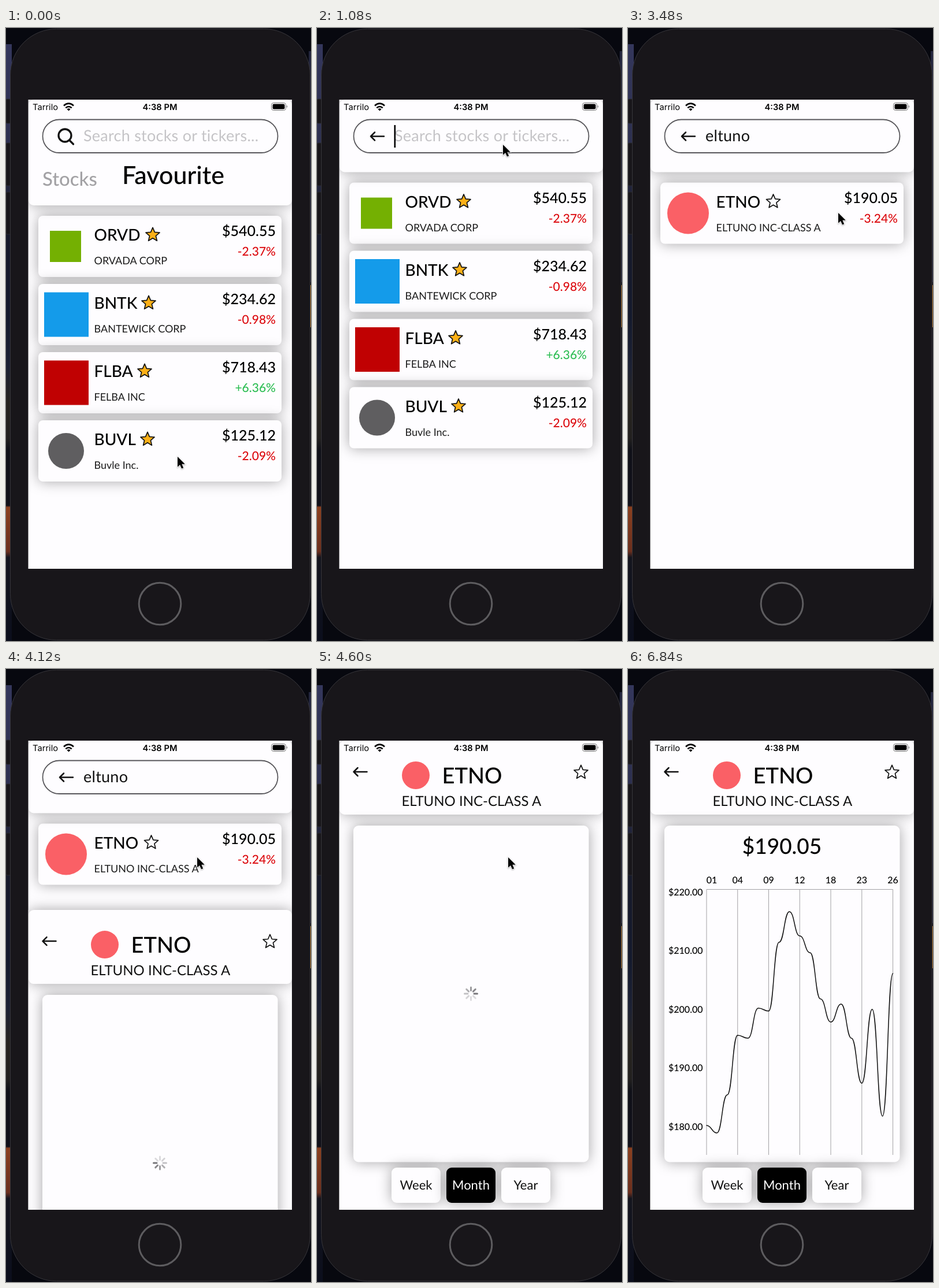
These frames come from a looping animation (528x1061 px, 6880 ms). An HTML page:

```html
<!DOCTYPE html>
<html lang="en">
<head>
<meta charset="utf-8">
<title>Stock search</title>
<style>
  html, body { margin: 0; width: 100%; height: 100%; overflow: hidden; background: #07080f; }
  svg { display: block; width: 528px; height: 1061px; }
  text { font-family: Lato, "Open Sans", sans-serif; text-rendering: geometricPrecision; white-space: pre; }
  .ui { font-family: Inter, Roboto, sans-serif; }
  .panel { fill: #fefdff; filter: drop-shadow(0 0 11.5px rgba(0, 0, 0, .35)); }
  .dark { fill: #000; }
  .line { fill: none; stroke: #111; stroke-linecap: round; stroke-linejoin: round; }
</style>
</head>
<body>
<svg id="stage" viewBox="0 0 528 1061"></svg>
<script>
const LOOP = 6880, STEP = 40;
const FOCUS = 700, SUBMIT = 3040, RESULT = 3200, OPEN = 3976, LOADED = 5240;
const QUERY = "eltuno", KEYS = [1960, 2120, 2280, 2480, 2640, 2800];
const COMPANY = "ELTUNO INC-CLASS A";
const RED = "#dc0a0f", GREEN = "#2fbe55", GOLD = "#fcb017", CORAL = "#fa6066";

// time, x, y of the pointer tip
const POINTER = [
  [0, 297, 742], [120, 297, 742], [640, 322, 202], [3080, 322, 202], [3480, 364, 320],
  [3720, 331, 326], [5640, 331, 326], [6240, 545, 640]
];

const text = (x, y, size, str, more = "") =>
  `<text x="${x}" y="${y}" font-size="${size}" ${more}>${str}</text>`;
const rect = (x, y, w, h, r, more = "") =>
  `<rect x="${x}" y="${y}" width="${w}" height="${h}" rx="${r}" ${more}/>`;
const panel = (x, y, w, h, r, more = "") => rect(x, y, w, h, r, `class="panel ${more}"`);
const disc = (x, y, r, fill) => `<circle cx="${x}" cy="${y}" r="${r}" fill="${fill}"/>`;
const square = (x, y, half, fill) => rect(x - half, y - half, 2 * half, 2 * half, 0, `fill="${fill}"`);
const mid = 'text-anchor="middle" ', end = 'text-anchor="end" ', medium = 'font-weight="500" ';

function star(x, y, fill) {
  const pts = Array.from({ length: 10 }, (_, i) => {
    const r = i % 2 ? 5.7 : 12.6, a = i * Math.PI / 5;
    return (x + r * Math.sin(a)).toFixed(1) + "," + (y - r * Math.cos(a)).toFixed(1);
  });
  return `<polygon points="${pts.join(" ")}" fill="${fill}" stroke="#111" stroke-width="1.7" stroke-linejoin="round"/>`;
}

const arrow = (x, y) =>
  `<path class="line" stroke-width="2.5" d="M${x + 23} ${y}H${x}m7-7L${x} ${y}l7 7"/>`;

const card = (y, logo, ticker, starX, fill, name, price, change) =>
  `<g transform="translate(0 ${y})">` + panel(56, 0, 421, 106, 8) + logo +
  text(152.5, 43, 28, ticker, medium) + star(starX, 33, fill) + text(152.5, 84, 18, name, 'fill="#1b1b1b"') +
  text(467, 35, 25, price, end + medium) +
  text(467, 69, 21, change, end + medium + `fill="${change[0] === "+" ? GREEN : RED}"`) + "</g>";

function chart() {
  const left = 136, dx = 17.92;
  const ys = [790, 803, 737, 634, 639, 587, 592, 473, 420, 462, 491, 571, 611, 580, 639, 717, 589, 774, 527];
  let d = `M${left} ${ys[0]}`;
  for (let i = 1; i < ys.length; i++) {
    const x = left + i * dx, m = x - dx / 2;
    d += `C${m} ${ys[i - 1]} ${m} ${ys[i]} ${x} ${ys[i]}`;
  }
  let out = text(266.5, 320, 37, "$190.05", mid + medium), grid = "M136 381.5H458.5";
  ["01", "04", "09", "12", "18", "23", "26"].forEach((day, i) => {
    const x = left + i * dx * 3;
    grid += `M${x} 381.5V841`;
    out += text(i ? x : 145, 371, 16, day, mid + medium);
  });
  for (let i = 0; i < 5; i++)
    out += text(129.5, 391.5 + i * 101.5, 16, `$${220 - i * 10}.00`, end + medium);
  return out + `<path d="${grid}" fill="none" stroke="#a2a1a4"/><path class="line" stroke-width="1.5" d="${d}"/>`;
}

const spokes = Array.from({ length: 8 }, (_, i) =>
  `<path d="M0-5.5V-11" stroke="#77767a" stroke-width="3" stroke-linecap="round" transform="rotate(${i * 45})"/>`).join("");

const buttons = ["Week", "Month", "Year"].map((label, i) =>
  panel(129 + i * 95, 863, 85, 61, 9, i === 1 ? "dark" : "") +
  text(171.5 + i * 95, 901, 22, label, mid + `fill="${i === 1 ? "#fff" : "#111"}"`)).join("");

const backdrop = `
  <defs>
    <linearGradient id="wall" x2="0" y2="1">
      <stop offset="0" stop-color="#34375c"/><stop offset=".16" stop-color="#2d3050"/>
      <stop offset=".31" stop-color="#171a2a"/><stop offset=".46" stop-color="#141a2d"/>
      <stop offset=".54" stop-color="#1c2134"/><stop offset=".6" stop-color="#27241f"/>
      <stop offset=".66" stop-color="#22201f"/><stop offset=".68" stop-color="#0f1018"/>
      <stop offset=".773" stop-color="#101019"/><stop offset=".776" stop-color="#8b401f"/>
      <stop offset=".85" stop-color="#6b2f1d"/><stop offset=".86" stop-color="#14151e"/>
      <stop offset="1" stop-color="#0b0e1c"/>
    </linearGradient>
    <clipPath id="glass"><rect x="38.5" y="124" width="456.5" height="812"/></clipPath>
  </defs>
  <rect width="528" height="1061" fill="#07080f"/>
  <rect y="28" width="10" height="1033" fill="url(#wall)"/>
  <rect x="524" y="40" width="4" height="400" fill="#23263d"/>
  <rect x="524" y="445" width="4" height="73" fill="#a8702a"/>` +
  [[123, 42], [199, 74], [284, 73]].map(([y, h]) => rect(0, y, 9, h, 2, 'fill="#18161a" stroke="#2b2b2f"')).join("") +
  rect(7.5, 1.5, 519, 1058, 80, 'fill="#18161a" stroke="#37363b"') +
  '<circle cx="266.5" cy="996.5" r="36.3" fill="none" stroke="#5d5c5f" stroke-width="3"/>' +
  '<rect x="38.5" y="124" width="456.5" height="812" fill="#fefdff"/>';

const statusBar =
  text(46, 142, 14.7, "Tarrilo", 'class="ui"') +
  text(266.5, 142, 14.7, "4:38 PM", mid + 'class="ui" font-weight="600"') +
  `<g fill="none" stroke="#000" stroke-width="2.6">
    <path d="M100 134.5q8.5-7.6 17 0M103.3 138.2q5.2-4.4 10.4 0"/></g>
  <path d="M108.5 143.5l-3-3q3-2.4 6 0z"/>
  <rect x="459.5" y="129.5" width="25" height="13" rx="3.8" fill="none" stroke="#777"/>
  <rect x="461.5" y="131.5" width="21" height="9" rx="2.2"/>
  <path d="M486 133.8q2.4 2.2 0 4.4z" fill="#777"/>`;

const stage = document.getElementById("stage");
stage.innerHTML = backdrop + `
<g clip-path="url(#glass)">
  <g id="favourites">` +
    card(325, square(103, 53, 27, "#74b002"), "ORVD", 254, GOLD, "ORVADA CORP", "$540.55", "-2.37%") +
    card(443, square(104.5, 53, 38.5, "#149bea"), "BNTK", 247, GOLD, "BANTEWICK CORP", "$234.62", "-0.98%") +
    card(561, square(104.5, 53, 38.5, "#c00102"), "FLBA", 240, GOLD, "FELBA INC", "$718.43", "+6.36%") +
    card(679, disc(104, 53, 31, "#5f5e60"), "BUVL", 245, GOLD, "Buvle Inc.", "$125.12", "-2.09%") + `
  </g>
  <g id="result">` +
    card(267.5, disc(104, 53, 36, CORAL), "ETNO", 251.5, "none", COMPANY, "$190.05", "-3.24%") + `
  </g>
  <rect id="header" class="panel" x="39" y="124" width="456" height="183" rx="9"/>
  <g id="tabs">` +
    text(63, 273, 33, "Stocks", medium + 'fill="#a3a2a5"') + text(201, 270, 43, "Favourite", medium) + `
  </g>
  <rect x="63.5" y="158.5" width="407" height="57.5" rx="28.7" fill="#fefdff" stroke="#57565a" stroke-width="1.8"/>
  <path id="lens" class="line" stroke="#2b2b2d" stroke-width="3.3" d="M110.5 195l6 6M113 186a11 11 0 1 1-22 0a11 11 0 1 1 22 0"/>
  <g id="back">${arrow(93, 187.5)}</g>` +
  text(134, 196, 27, "Search stocks or tickers...", 'id="hint" fill="#c5c4c7" letter-spacing=".25"') +
  text(134, 196, 27, "", 'id="query" fill="#111" letter-spacing=".25"') + `
  <rect id="caret" y="168" width="2.6" height="39"/>
  <g id="detail">
    <rect x="38.5" y="124" width="456.5" height="812" fill="#fefdff"/>` +
    panel(39, 124, 456, 128, 9) + arrow(63.5, 178) + disc(171, 184, 24, CORAL) +
    text(216.5, 198, 38, "ETNO", medium) + text(146.5, 236.5, 24, COMPANY, 'fill="#111"') +
    star(457, 179, "none") + panel(63, 271, 407.5, 582.5, 9) + buttons + `
    <g id="spinner" transform="translate(266.5 562)">${spokes}</g>
    <g id="chart">${chart()}</g>
  </g>
  ${statusBar}
</g>
<g id="pointer"><path transform="scale(.82)" d="M0 0V21.5L5 17L8.6 25L12.4 23.4L9 15.4H15.6Z" stroke="#fff"
  stroke-width="2" paint-order="stroke" style="filter: drop-shadow(0 1px 1.5px rgba(0,0,0,.35))"/></g>`;

const el = {};
stage.querySelectorAll("[id]").forEach(n => el[n.id] = n);

const clamp = v => Math.max(0, Math.min(1, v));
const smooth = v => v * v * (3 - 2 * v);
const show = (node, on) => node.style.display = on ? "" : "none";
const move = (node, x, y) => node.setAttribute("transform", `translate(${x} ${y})`);

function pointerAt(t) {
  let i = 0;
  while (i < POINTER.length - 2 && t >= POINTER[i + 1][0]) i++;
  const [t0, x0, y0] = POINTER[i], [t1, x1, y1] = POINTER[i + 1];
  const p = smooth(clamp((t - t0) / (t1 - t0)));
  return [x0 + (x1 - x0) * p, y0 + (y1 - y0) * p];
}

function draw(t) {
  const focused = t >= FOCUS, fold = smooth(clamp((t - FOCUS) / 280));
  move(el.favourites, 0, -57.5 * fold);
  el.header.setAttribute("height", 183 - 57.5 * fold);
  el.tabs.style.opacity = clamp(1 - 2 * fold);
  show(el.lens, !focused);
  show(el.back, focused);
  show(el.favourites, t < RESULT);
  show(el.result, t >= RESULT);

  const typed = KEYS.filter(k => t >= k);
  el.query.textContent = QUERY.slice(0, typed.length);
  show(el.hint, !typed.length);
  const blink = (t - (typed.at(-1) ?? FOCUS)) % 1000 < 600;
  show(el.caret, focused && t < SUBMIT && blink);
  el.caret.setAttribute("x", 133.5 + (typed.length ? el.query.getComputedTextLength() : 0));

  move(el.detail, 0, 812 * (1 - clamp((t - OPEN) / 500)) ** 3);
  show(el.detail, t >= OPEN);
  show(el.spinner, t < LOADED);
  show(el.chart, t >= LOADED);
  const head = Math.floor(t / 125) + 6;
  [...el.spinner.children].forEach((s, i) =>
    s.style.opacity = Math.max(.25, 1 - (head - i) % 8 * .14));

  move(el.pointer, ...pointerAt(t));
}

function tick() {
  draw(Math.floor(performance.now() % LOOP / STEP) * STEP);
  requestAnimationFrame(tick);
}
tick();
</script>
</body>
</html>
```
